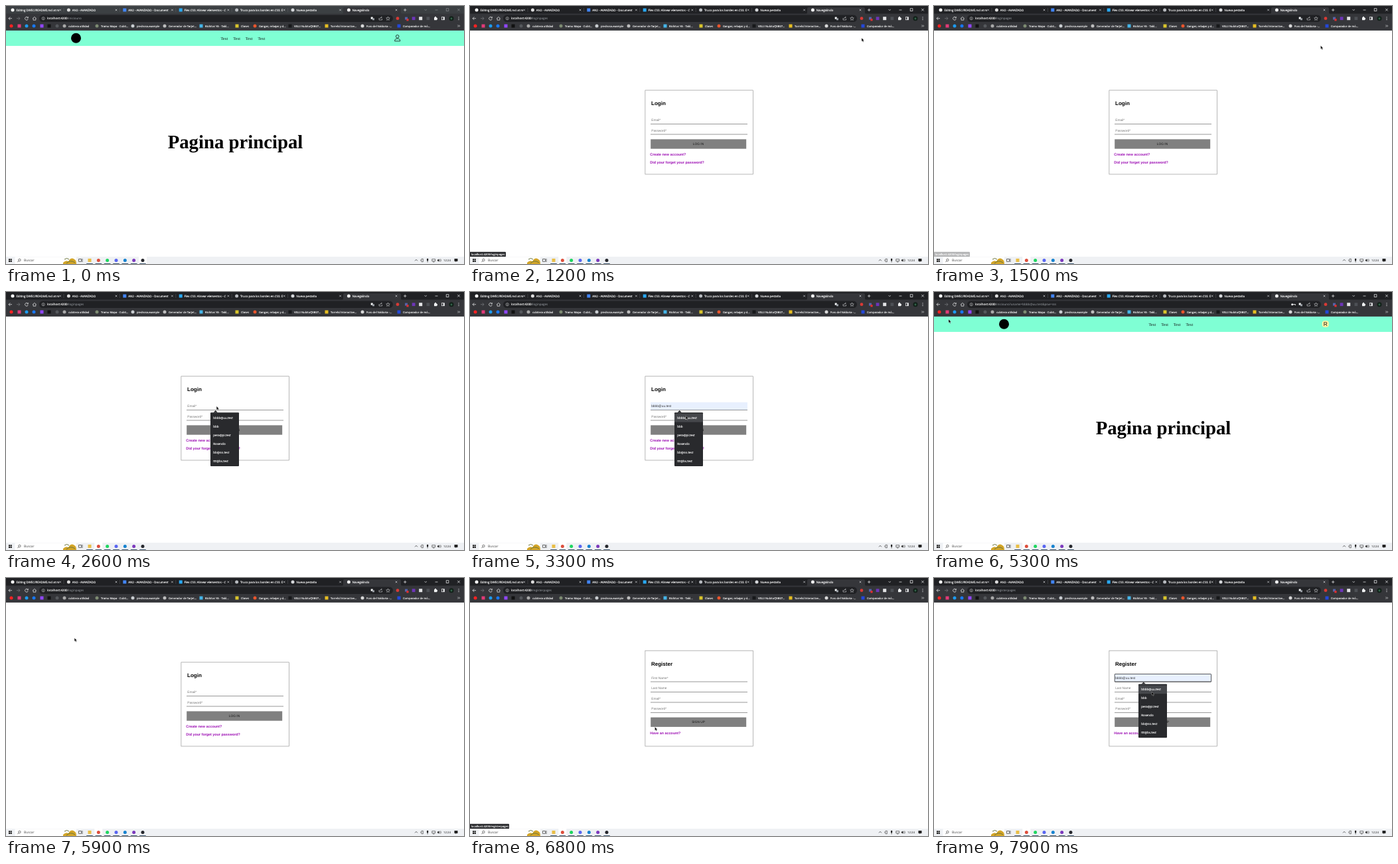
Recreate the animation shown at these times as an HTML page. Size 690 by 388 pixels, loop 8 s.

```html
<!DOCTYPE html>
<html lang="es">
<head>
<meta charset="utf-8">
<style>
  html, body { margin: 0; width: 100%; height: 100%; overflow: hidden; background: #fff; }
  svg { display: block; width: 100%; height: 100%; }
  text { font: 4.4px "Open Sans", sans-serif; text-rendering: geometricPrecision; white-space: pre; }
  .page { font-family: "Liberation Sans", Arial, sans-serif; }
  .serif { font-family: "Liberation Serif", "Times New Roman", serif; }
  .bold { font-weight: bold; }
  .bright { stroke: #fff; stroke-width: .14px; }
</style>
</head>
<body>
<svg id="stage" viewBox="0 0 690 388"></svg>
<script>
const LOOP = 8000, STEP = 100;
const stage = document.getElementById('stage');

const rect = (x, y, w, h, fill, extra = '') =>
  `<rect x="${x}" y="${y}" width="${w}" height="${h}" fill="${fill}" ${extra}/>`;
const dot = (x, y, r, fill) => `<circle cx="${x}" cy="${y}" r="${r}" fill="${fill}"/>`;
const square = (x, y, r, fill) => rect(x - r, y - r, 2 * r, 2 * r, fill);
const line = (d, color, width = 0.7) =>
  `<path d="${d}" fill="none" stroke="${color}" stroke-width="${width}"/>`;
const text = (x, y, str, fill, size = 4.4, cls = '', extra = '') =>
  `<text x="${x}" y="${y}" fill="${fill}" class="${cls}" style="font-size:${size}px" ${extra}>${str}</text>`;
const cross = (x, y, r, color, width) =>
  line(`M${x - r} ${y - r}l${2 * r} ${2 * r}m0 ${-2 * r}l${-2 * r} ${2 * r}`, color, width);

const tabs = [
  ['Editing DWEC/README.md at m', '#fff', dot],
  ['AN2 - AVANZADO', '#ddd', dot],
  ['AN2 - AVANZADO - Document', '#4285f4', square],
  ['Flex CSS: Alinear elementos - C', '#29a9f2', square],
  ['Truco para los bordes en CSS: E', '#b8bbbf', dot],
  ['Nueva pestaña', '#d5d7da', dot],
  ['Navegalindo', '#f1f1f1', dot],
];

const bookmarks = [
  [8, '#f22', dot], [20, '#e23a78', square], [31, '#1d9bf0', dot], [42, '#1877f2', dot],
  [54, '#9146ff', square], [65, '#111', square], [77, '#55585c', dot],
  [88, '#a9a9a9', dot, 'cubitera utilidad'],
  [137, '#7d8b72', dot, 'Tramo Mapa - Cubit...'],
  [191, '#c9cdd1', dot, 'piedrosa.example'],
  [239, '#bdbdbd', dot, 'Generador de Tarjet...'],
  [294, '#45b5e8', square, 'Bichitos YA - Tabl...'],
  [348, '#d9c52c', square, 'Clases'],
  [375, '#e8552d', dot, 'Gangas, rebajas y d...'],
  [428, '#17181a', square, 'VELU NubitoQX#27...'],
  [483, '#e6bd22', square, 'Torrelid Interactive...'],
  [537, '#d8d8d8', dot, 'Foro del Valdoria -...'],
  [592, '#2447d8', square, 'Comparador de mó...'],
];

const users = ['bbbb@uu.test', 'bbb', 'pera@pi.test', 'Rosendo', 'bb@nn.test', 'ttt@bs.test'];

function tabStrip(focused) {
  const strip = focused ? '#202124' : '#3c4043';
  const control = focused ? '#f1f3f4' : '#85888c';
  let out = rect(0, 0, 690, 12, strip) + rect(0, 11.5, 690, 25.4, '#35363a') +
    '<path d="M506 12q2 0 2-2V4q0-2 2-2h83q2 0 2 2v6q0 2 2 2z" fill="#35363a"/>';
  tabs.forEach(([title, color, icon], i) => {
    const x = 10 + i * 84.4;
    out += icon(x, 6, 2.5, color) + text(x + 5.4, 7.7, title, '#fff', 4.4, 'bright') +
      cross(x + 71.6, 6, 1.3, '#e8eaed', 0.6);
    if (i < 5) out += line(`M${x + 77} 3v6`, '#6a6d72', 0.4);
  });
  return out + line('M599 6h4.4M601.2 3.8v4.4', '#f1f3f4') +
    line('M630.5 5l1.7 1.7 1.7-1.7M646.5 6h4', control, 0.7) +
    `<rect x="663.2" y="3.8" width="3.7" height="3.7" fill="none" stroke="${control}" stroke-width=".7"/>` +
    cross(682, 5.7, 1.8, control, 0.7);
}

function toolbar(path, loading, key) {
  const icon = '#f1f3f4';
  let out = rect(50, 13.6, 533, 10.4, '#202124', 'rx="5.2"') +
    line('M9 18.7H4m2.3-2.3L4 18.7 6.3 21', icon) +
    line('M16 18.7h5m-2.3-2.3l2.3 2.3-2.3 2.3', '#7b7e82') +
    (loading ? cross(31, 18.7, 1.9, icon, 0.8)
      : line('M32.8 17.2a2.4 2.4 0 1 0 .5 2.3M33.3 16v2h-2', icon)) +
    line('M40.2 18.8l2.7-2.4 2.7 2.4M41 18.2v3h3.8v-3', icon) +
    line('M56.2 18.2v2m0-3v.5', icon, 0.6) +
    '<circle cx="56.2" cy="18.7" r="2.2" fill="none" stroke="#d8dadd" stroke-width=".5"/>' +
    text(62, 20.4, `<tspan class="bright">localhost:4200</tspan><tspan fill="#a4a9af">/${path}</tspan>`, '#fff', 4.55);
  if (key) out += dot(539.7, 18.7, 1.5, icon) + line('M541 18.7h3.4v1.4', icon, 1);
  return out +
    rect(549.7, 16.5, 3, 3.2, icon) + rect(552, 18.3, 3, 3, '#9aa0a6') +
    line('M562 18v3h4.5v-2M563.2 19.5q.3-2.5 3-2.5m-1-1l1.2 1-1.2 1', icon, 0.5) +
    line('M575.5 16l.8 1.8 2 .2-1.5 1.4.4 2-1.7-1-1.7 1 .4-2-1.5-1.4 2-.2z', icon, 0.5) +
    dot(590, 18.7, 2.4, '#d83a35') + square(603, 18.6, 2, '#5662a8') + square(605, 20.8, 1.6, '#e32e2e') +
    square(614.1, 18.7, 2.4, '#6d35b8') + square(624.7, 18.7, 2.5, '#e3e4e6') +
    square(635.9, 18.7, 2.4, '#4d5055') +
    rect(645, 17.2, 4.2, 4, icon) + dot(647, 16.8, 1.1, icon) + dot(649.2, 19.2, 1, icon) +
    square(658.4, 18.7, 2.4, icon) + rect(656.7, 17, 2, 3.4, '#35363a') +
    dot(671, 18.7, 3.5, '#122119') + dot(671, 19, 1.4, '#33634a') +
    [16.8, 18.7, 20.6].map(y => dot(682, y, 0.55, icon)).join('');
}

function bookmarkBar() {
  return bookmarks.map(([x, color, icon, label]) => icon(x, 30, 2.5, color) +
    (label ? text(x + 6, 31.6, label, '#fff', 4.15, 'bright') : '')).join('') +
    line('M680.4 28.5l1.4 1.5-1.4 1.5m2-3l1.4 1.5-1.4 1.5', '#f1f3f4', 0.6);
}

function taskbar(focused) {
  const apps = ['#e9be45', '#dd4e3c', '#1ed760', '#5865f2', '#1683d0', '#7c39bd', '#25272c'];
  const active = focused ? 1 : 6;
  let out = rect(0, 377, 690, 11, '#eff1f4') + rect(13.5, 377.5, 92.5, 10.5, '#fff') +
    [[4, 380.2], [6.6, 380.2], [4, 382.8], [6.6, 382.8]].map(([x, y]) => rect(x, y, 2.2, 2.2, '#222')).join('') +
    '<circle cx="20.4" cy="382" r="1.7" fill="none" stroke="#222" stroke-width=".6"/>' +
    line('M19.2 383.3l-1.7 1.8', '#222') + text(27, 384.3, 'Buscar', '#444', 4.9) +
    '<path d="M86 388v-2q4-4 8-2 4-7 9-3 3 1 3 7z" fill="#d3a527"/>' +
    line('M88 381q4-3 7 0M91 387q6-6 13-1', '#69733b', 1) +
    line('M109.5 380.5h4v3.8h-4zM115 380v5', '#333', 0.7);
  apps.forEach((color, i) => {
    const x = 126 + i * 13.33;
    if (i === active) out += rect(x - 6, 377, 12, 11, '#fff');
    out += (i ? dot : square)(x, 382.4, 2.5, color) + rect(x - 4.8, 387.1, 9.6, 0.9, '#2c4862');
  });
  return out + line('M616 383.3l2-2 2 2', '#222') +
    line('M626 380.3h2.4v4.4H626zM624.8 381.5v2', '#333', 0.6) +
    rect(634, 379.7, 2.2, 3.6, '#111', 'rx="1"') + line('M635.1 383v2.4', '#111') +
    line('M641.8 380.7h4.8v3h-4.8zM643 385h2.5', '#222', 0.6) +
    '<path d="M650 381.6h1l1.4-1.3v4.4l-1.4-1.3h-1z" fill="#222"/>' +
    line('M653.3 381q1.3 1.5 0 3M654.6 380.3q2 2.2 0 4.4', '#222', 0.5) +
    text(659, 384.1, '12:24', '#111', 4.3) +
    '<path d="M675.5 380h5v4h-2l-1 1.3v-1.3h-2z" fill="#222"/>';
}

function homePage(loggedIn) {
  const user = loggedIn
    ? rect(584.8, 43.2, 10, 9.7, '#fff3a3', 'rx="3.6"') +
      text(589.8, 51, 'R', '#111', 8.4, 'page', 'text-anchor="middle"')
    : '<circle cx="589.7" cy="45.8" r="2.3" fill="none" stroke="#111" stroke-width=".8"/>' +
      line('M585.6 52.8q0-3.7 4.1-3.7t4.1 3.7z', '#111', 0.8);
  return rect(0, 36.5, 690, 23.5, '#7fffd4') + dot(105.5, 48.3, 7.5, '#000') +
    [323.5, 342.2, 360.8, 379.4].map(x => text(x, 50.8, 'Text', '#111', 6.1, 'serif')).join('') + user +
    text(345.5, 213.6, 'Pagina principal', '#000', 28.75, 'serif bold', 'text-anchor="middle"');
}

const field = (y, label, value) =>
  (value ? rect(272, y - 5.7, 146, 11.6, '#e8f0fe') : '') +
  text(273.2, y + 1.6, value || label, value ? '#333' : '#757575', 4.8, 'page') +
  rect(272, y + 5.7, 146, 0.6, '#555');

const form = (top, title, buttonY, button) =>
  `<rect x="263.9" y="${top}" width="162.4" height="${253 - top}" fill="#fff" stroke="#888" stroke-width=".6"/>` +
  text(273, top + 22.6, title, '#000', 8, 'page bold') +
  rect(272.2, buttonY, 144, 14.3, '#808080') +
  text(344, buttonY + 8.7, button, '#151515', 4.8, 'page', 'text-anchor="middle"');

const link = (y, str) => text(271.3, y, str, '#9c0db3', 5.38, 'page bold');

function loginPage(email, filled) {
  return form(126.8, 'Login', 200.4, 'LOG IN') + field(171.5, 'Email*', email) +
    field(187, filled ? '' : 'Password*') +
    (filled ? [274.2, 276, 277.8].map(x => dot(x, 186.9, 0.75, '#222')).join('') : '') +
    link(225.2, 'Create new account?') + link(236.9, 'Did your forget your password?');
}

function registerPage(name, focused) {
  return form(109.2, 'Register', 209.6, 'SIGN UP') +
    ['First Name*', 'Last Name', 'Email*', 'Password*']
      .map((label, i) => field(150 + i * 15.5, label, i ? '' : name)).join('') +
    (focused ? '<rect x="272.2" y="144.4" width="145.4" height="11.7" rx=".8" fill="none" stroke="#111" stroke-width=".7"/>' : '') +
    link(234.7, 'Have an account?');
}

const dropdown = (y, hover) =>
  `<path d="M312.5 ${y}l3.2-3.2 3.2 3.2z" fill="#292a2d"/>` +
  rect(308, y, 43, 80.7, '#292a2d', 'rx="1"') + (hover ? rect(308, y + 1.7, 43, 12.8, '#45474b') : '') +
  users.map((name, i) => text(312.2, y + 9.6 + i * 12.95, name, '#fff', 4.5, 'bright')).join('');

const statusBar = (path, width, opacity) => `<g opacity="${opacity}">` +
  rect(-1, 369.8, width + 1, 7.4, '#292a2d', 'rx="1"') +
  text(1.8, 375, `localhost:4200/${path}`, '#fff', 4.2, 'bright') + '</g>';

// Pointer path: time, x, y
const pointer = [
  [100, 604, 70], [300, 601, 62], [700, 601, 62], [900, 591, 49], [1200, 590, 48], [1500, 582.5, 59.5],
  [1600, 544, 103], [1800, 544, 103], [2300, 318, 171], [2700, 317, 172], [3100, 325, 186],
  [3700, 325, 187], [4200, 321.5, 209], [4600, 321.5, 209], [4800, 451, 142], [4900, 457, 102],
  [5300, 22, 41], [5500, 6, 18], [5700, 6, 18], [6200, 282, 223], [6600, 278.5, 224],
  [7000, 278.5, 224], [7400, 317, 150], [7600, 317, 150], [7900, 328, 171],
];

function cursor(t) {
  if (t < pointer[0][0]) return '';
  const next = Math.max(1, pointer.findIndex(p => p[0] >= t));
  const [t0, x0, y0] = pointer[next - 1], [t1, x1, y1] = pointer[next];
  const k = (t - t0) / (t1 - t0), s = k * k * (3 - 2 * k);
  return `<path transform="translate(${x0 + (x1 - x0) * s} ${y0 + (y1 - y0) * s})"
    d="M0 0v5.2l1.2-1 .9 2 1-.4-.9-1.9h1.6z" fill="#000" stroke="#fff" stroke-width=".3"/>`;
}

function scene(t) {
  const within = (a, b) => t >= a && t < b;
  const focused = t >= 1100;
  let path = 'loginpages', page;

  if (t < 1200) {
    path = 'iniciouno';
    page = homePage(false);
  } else if (t < 4600) {
    page = loginPage(t >= 3100 ? users[0] : '', t >= 3700);
    if (within(2500, 3700)) page += dropdown(181.2, t >= 3000);
  } else if (t < 5700) {
    path = `iniciouno?uname=${users[0]}&amp;psw=sss`;
    page = homePage(true);
  } else if (t < 6600) {
    page = loginPage('', false);
  } else {
    path = 'registerpages';
    page = registerPage(t >= 7800 ? users[0] : '', t >= 7400);
    if (t >= 7600) page += dropdown(159.6, t >= 7800);
  }

  let status = '';
  if (within(900, 1600)) status = statusBar('loginpages', 54, t < 1400 ? 1 : t < 1500 ? 0.7 : 0.35);
  if (within(6200, 7400)) status = statusBar('registerpages', 59, t < 7200 ? 1 : t < 7300 ? 0.7 : 0.35);

  return rect(0, 0, 690, 388, '#fff') + page + tabStrip(focused) +
    toolbar(path, within(4500, 4600), within(3700, 5700)) + bookmarkBar() +
    status + taskbar(focused) + cursor(t);
}

let shown = -1;
function frame() {
  const t = Math.floor(performance.now() % LOOP / STEP) * STEP;
  if (t !== shown) stage.innerHTML = scene(shown = t);
  requestAnimationFrame(frame);
}
frame();
</script>
</body>
</html>
```
